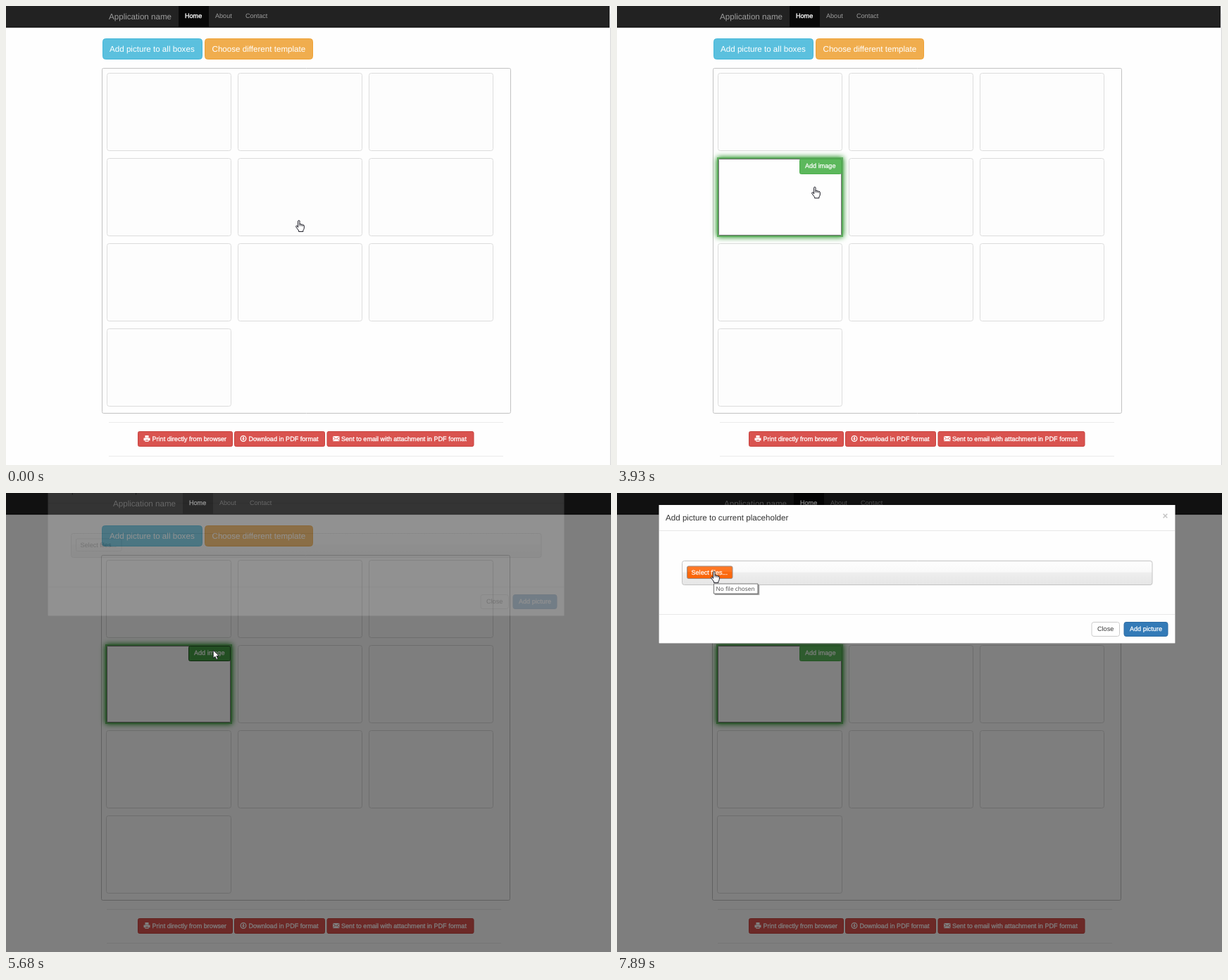
Animation of 859 by 652 pixels, one loop 8000 ms. Source, as an HTML page with a canvas:

```html
<!DOCTYPE html>
<html lang="en">
<head>
<meta charset="utf-8">
<title>Template editor</title>
<style>
html, body { margin: 0; width: 100%; height: 100%; overflow: hidden; background: #fefefe; }
canvas { display: block; }
</style>
</head>
<body>
<canvas id="stage" width="859" height="652"></canvas>
<script>
const W = 859, H = 652, LOOP = 8000, TICK = 120;
const CLICK = 5400, MODAL_IN = 5658, REACH = 6950;
const SANS = '"Liberation Sans", Arial, sans-serif';
const SMALL = 9.1, LARGE = 11.62;

const stage = document.getElementById('stage');
const spare = document.createElement('canvas');
spare.width = W;
spare.height = H;
let c = stage.getContext('2d');
const spareCtx = spare.getContext('2d');
c.textRendering = spareCtx.textRendering = 'geometricPrecision';

// Pointer moves: from, to (ms), then where the tip ends
const MOVES = [
  [430, 430, 412, 306], [580, 940, 342, 321], [1090, 1360, 317, 326],
  [1510, 1640, 290, 307], [1790, 2180, 259, 263], [3690, 3930, 280, 256.5],
  [4080, 4440, 294, 223], [6410, 6410, 289, 225], [6530, 6800, 181, 139],
  [REACH, 7100, 137, 111]
];

// Progress 0..1 in equal held steps about one tick apart, the last one at "to"
function steps(t, from, to) {
  if (t < from) return 0;
  const gaps = Math.round((to - from) / TICK);
  if (t >= to) return 1;
  return (Math.floor((t - from) / (to - from) * gaps) + 1) / (gaps + 1);
}

function tip(t) {
  let x = 415, y = 304;
  for (const [from, to, tx, ty] of MOVES) {
    const p = steps(t, from, to);
    x += (tx - x) * p;
    y += (ty - y) * p;
  }
  return [x, y];
}

function rect(x, y, w, h, color) {
  c.fillStyle = color;
  c.fillRect(x, y, w, h);
}

function box(x, y, w, h, r, fill, border) {
  c.beginPath();
  c.roundRect(x + 0.5, y + 0.5, w - 1, h - 1, r);
  if (fill) { c.fillStyle = fill; c.fill(); }
  c.lineWidth = 1;
  c.strokeStyle = border;
  c.stroke();
}

function text(s, x, y, size, color, heavy = 0, font = SANS, style = '') {
  c.font = `${style} ${size}px ${font}`;
  c.fillStyle = c.strokeStyle = color;
  c.fillText(s, x, y);
  if (heavy) { c.lineWidth = heavy; c.strokeText(s, x, y); }
}

function shade(y, h, ...colors) {
  const g = c.createLinearGradient(0, y, 0, y + h);
  [0, 0.46, 0.5, 1].forEach((p, i) => g.addColorStop(p, colors[i]));
  return g;
}

// Paint a group as one sheet, so that its parts fade together
function layer(alpha, dy, paint) {
  if (alpha <= 0) return;
  const main = c;
  c = spareCtx;
  c.clearRect(0, 0, W, H);
  paint();
  c = main;
  c.globalAlpha = alpha;
  c.drawImage(spare, 0, dy);
  c.globalAlpha = 1;
}

function navbar(wide) {
  const dx = wide ? 6 : 0, w = wide ? W : 857;
  rect(0, 0, w, 30.5, '#222');
  rect(0, 29.5, w, 1, '#080808');
  rect(245 + dx, 0, 43, 30, '#080808');
  text('Application name', 146 + dx, 18.5, LARGE, '#9d9d9d');
  text('Home', 254 + dx, 17, SMALL, '#fff', 0.35);
  text('About', 297 + dx, 17, SMALL, '#9d9d9d');
  text('Contact', 340 + dx, 17, SMALL, '#9d9d9d');
  if (!wide) {
    rect(857, 0, 2, H, '#f6f6f6');
    rect(858, 11, 1, H, '#dadada');
  }
}

function printer(x, y) {
  rect(x + 2, y, 5, 3.4, '#fff');
  rect(x, y + 3.6, 9, 3.6, '#fff');
  rect(x + 2, y + 5.6, 5, 3.4, '#fff');
  rect(x + 2.7, y + 6.2, 3.6, 0.8, '#d9534f');
  rect(x + 2.7, y + 7.6, 3.6, 0.6, '#d9534f');
}

function download(x, y) {
  c.beginPath();
  c.arc(x + 4.5, y + 4.5, 3.8, 0, 7);
  c.strokeStyle = '#fff';
  c.lineWidth = 1.3;
  c.stroke();
  rect(x + 3.8, y + 2, 1.5, 2.6, '#fff');
  c.fill(new Path2D(`M${x + 2.3} ${y + 4.4}h4.4l-2.2 2.6z`));
}

function envelope(x, y) {
  rect(x, y + 1, 9.5, 7.2, '#fff');
  c.strokeStyle = '#d9534f';
  c.lineWidth = 0.8;
  c.stroke(new Path2D(`M${x} ${y + 1.4}l4.75 3.9 4.75-3.9M${x} ${y + 7.8}l3.3-3.5M${x + 9.5} ${y + 7.8}l-3.3-3.5`));
}

function redButton(x, w, icon, label) {
  box(x, 604, w, 22, 2, '#d9534f', '#c84440');
  icon(x + 8.5, 610);
  text(label, x + 20.5, 618, SMALL, '#fff', 0.3);
}

function activeCell(x, t) {
  const w = 319 - x;
  c.shadowColor = 'green';
  c.shadowBlur = 8;
  rect(x - 2, 215, w + 4, 113, '#fefefe');
  c.shadowColor = 'transparent';
  // The glow alone stays visible around the cell
  c.globalCompositeOperation = 'destination-out';
  rect(x - 2, 215, w + 4, 113, '#000');
  c.globalCompositeOperation = 'source-over';
  c.lineWidth = 3;
  c.strokeStyle = 'rgba(0,128,0,.62)';
  c.strokeRect(x - 0.5, 216.5, w + 1, 110);
  box(x, 217, w, 109, 1, '#fefefe', '#777');

  const held = t >= CLICK && t < 6110, over = t >= 4200 && t < 6110;
  box(259, 217, 60, 22, 2, over ? '#449d44' : '#5cb85c', held ? '#255625' : over ? '#398439' : '#4cae4c');
  text('Add image', 267, 230, SMALL, '#fff', 0.25);
}

function page(t) {
  const wide = t >= CLICK, left = wide ? 1 : 0;
  rect(0, 0, W, H, '#fefefe');
  navbar(wide);
  box(137 - left, 46, 142 + left, 30, 4, '#5bc0de', '#46b8da');
  text('Add picture to all boxes', 147, 65, LARGE, '#fff');
  box(282, 46, 154, 30, 4, '#f0ad4e', '#eea236');
  text('Choose different template', 292.5, 65, LARGE, '#fff');

  box(136 - left, 88, 581, 491, 2, null, '#c2c2c2');
  for (let i = 0; i < 10; i++) {
    const edge = i % 3 ? 0 : left;
    box(143 + i % 3 * 186 - edge, 95 + Math.floor(i / 3) * 121, 177 + edge, 111, 3, '#fdfdfd', '#dcdcdc');
  }
  layer(steps(t, 2740, 2860), 0, () => activeCell(144 - left, t));

  for (const y of [591, 639]) rect(146 - 3 * left, y, 560, 1, '#ebebeb');
  redButton(187, 135, printer, 'Print directly from browser');
  redButton(324, 129, download, 'Download in PDF format');
  redButton(455.5, 209, envelope, 'Sent to email with attachment in PDF format');
}

function modal(hot) {
  rect(59, 16, 734, 198, 'rgba(0,0,0,.2)');
  rect(59.5, 17, 733, 196.5, '#fefefe');
  text('Add picture to current placeholder', 69, 39, LARGE, '#333');
  text('×', 774.5, 36.5, 13.5, '#c4c4c4', 0, SANS, 'bold');
  for (const y of [53, 172]) rect(60, y, 732, 1, '#e8e8e8');

  box(92, 96, 668.5, 35, 3, shade(96, 35, '#fefefe', '#f9f9f9', '#eee', '#e5e5e5'), '#c3c3c3');
  const skin = hot ? ['#ff7a28', '#fd7420', '#fb6a10', '#fa6408'] : ['#fefefe', '#fafafa', '#f2f2f2', '#eee'];
  box(99, 103.5, 65.5, 18.5, 2, shade(103, 19, ...skin), hot ? '#9c8c84' : '#bdbdbd');
  text('Select files...', 105.5, 116, SMALL, hot ? '#fff' : '#333', hot ? 0.25 : 0);

  box(673.5, 183, 40.5, 21, 3, '#fff', '#ccc');
  text('Close', 682, 196, SMALL, '#333');
  box(719.5, 183, 63, 21, 3, '#337ab7', '#2e6da4');
  text('Add picture', 728, 196, SMALL, '#fff', 0.25);
}

function tooltip() {
  rect(139, 131, 63.5, 14, 'rgba(0,0,0,.22)');
  rect(138.5, 130, 63, 14.5, 'rgba(0,0,0,.3)');
  box(137, 128.5, 63.5, 15, 0, '#fefefe', '#767676');
  text('No file chosen', 140.5, 139, 8.25, '#575757', 0, '"Noto Sans", "Open Sans", sans-serif');
}

const HAND = new Path2D('M3.6 10.3V1.8Q3.6 .6 4.8 .6T6 1.8V6Q7.3 5 8.2 6.4 9.5 5.6 10.3 7 12 6.4 12.3 8.2V11.5Q12 13.5 10.9 14.6V16.4H4.6V15Q3 13 .8 9.8 .4 8.2 1.8 8 2.8 8.6 3.6 10.3Z');
const FINGERS = new Path2D('M6 5.5V8.6M8.2 6.2V8.8M10.3 6.9V9');
const ARROW = new Path2D('M.3 .3V11.6L2.9 9.2 4.8 13.4 6.7 12.5 4.9 8.5H8.3Z');

function cursor(t) {
  const [x, y] = tip(t);
  const arrow = t >= CLICK && t < REACH;
  const shape = arrow ? ARROW : HAND;
  c.save();
  c.translate(arrow ? x : x - 4, y);
  c.fillStyle = '#fff';
  c.fill(shape);
  c.strokeStyle = '#15151f';
  c.lineWidth = arrow ? 0.8 : 1;
  c.stroke(shape);
  c.lineWidth = 0.8;
  if (!arrow) c.stroke(FINGERS);
  c.restore();
}

function draw() {
  const t = performance.now() % LOOP;
  page(t);
  rect(0, 0, W, H, `rgba(0,0,0,${0.5 * steps(t, 5520, 5680) ** 2})`);

  // The dialog fades in 150 ms and slides down in 300 ms, seen at a low frame rate
  const age = 22 + 135 * Math.floor((t - MODAL_IN - 22) / 135);
  const slide = 49 * Math.max(0, 1 - age / 300) ** 3;
  layer(Math.min(1, age / 150), -Math.round(slide), () => modal(t >= REACH));
  layer(steps(t, 7650, 7890), 0, tooltip);
  cursor(t);
  requestAnimationFrame(draw);
}
draw();
</script>
</body>
</html>
```
